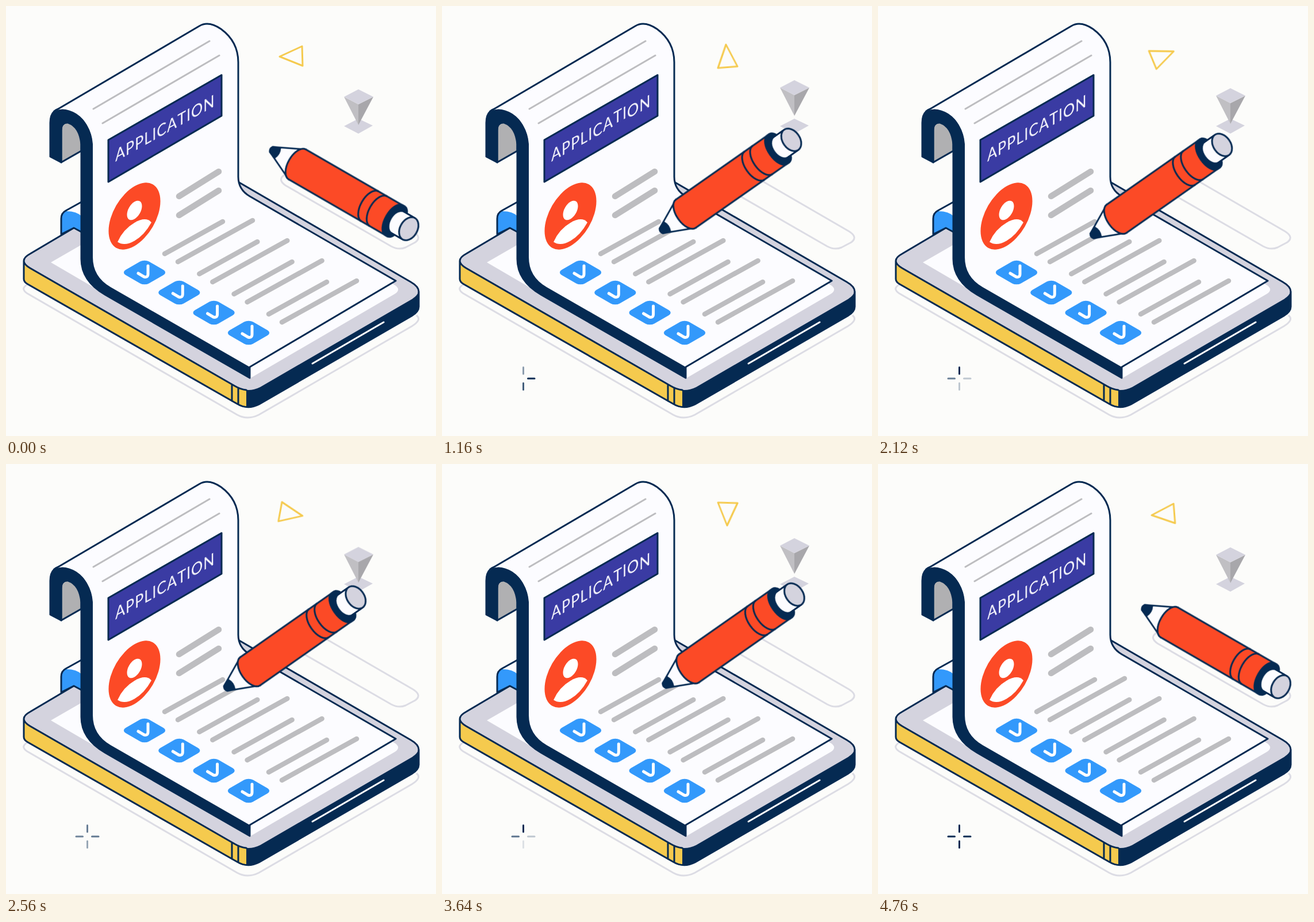
Recreate the animation shown at these times as an HTML page. Size 748 by 748 pixels, loop 4.8 s.

```html
<!DOCTYPE html>
<html lang="en">
<head>
<meta charset="utf-8">
<title>Application form</title>
<style>
  :root {
    --navy: #052a52; --red: #fc4a26; --blue: #3399fb; --yellow: #f5ca4e;
    --lilac: #d4d3de; --grey: #bdbdc0; --paper: #fcfcff;
    --loop: 4800ms; --sine: cubic-bezier(.37, 0, .63, 1);
  }
  html, body { margin: 0; width: 100%; height: 100%; overflow: hidden; background: #fcfcfa; }
  svg { position: absolute; left: 0; top: 0; width: 748px; height: 748px; }
  .line { fill: none; stroke: var(--navy); stroke-width: 3; stroke-linecap: round; stroke-linejoin: round; }
  .edge { stroke: var(--navy); stroke-width: 3; stroke-linejoin: round; }
  .trace { fill: none; stroke: #dcdce4; stroke-width: 3; }
  .rule { fill: none; stroke: var(--grey); stroke-linecap: round; }

  .title {
    position: absolute; left: 0; top: 0; white-space: nowrap;
    font: 400 29px/1 Lato, "Open Sans", sans-serif; letter-spacing: 1.2px; color: #fcfcff;
    transform-origin: 0 0; transform: matrix(.866, -.485, 0, 1, 190, 245);
  }
  .title span { display: inline-block; animation: hop 2400ms calc(var(--i) * 110ms) infinite; }
  @keyframes hop {
    0%, 6% { transform: none; animation-timing-function: var(--sine); }
    16.7% { transform: translateY(-4px); animation-timing-function: var(--sine); }
    27.4%, 100% { transform: none; }
  }

  .spin { transform-origin: 496px 87px; animation: spin var(--loop) linear infinite; }
  @keyframes spin { to { transform: rotate(360deg); } }

  .gem { animation: bob 1200ms var(--sine) infinite alternate; }
  @keyframes bob { to { transform: translateY(-16px); } }

  .travel { animation: travel var(--loop) var(--sine) infinite; }
  @keyframes travel {
    0% { transform: translate(459px, 248px); animation-timing-function: ease-in; }
    10.83% { transform: translate(427px, 281px); animation-timing-function: ease-out; }
    19.6% { transform: translate(384px, 388px); }
    37.5% { transform: translate(351px, 420px); }
    50% { transform: translate(385px, 387px); }
    62.5% { transform: translate(353px, 418px); }
    75% { transform: translate(384px, 388px); animation-timing-function: ease-in; }
    87.5% { transform: translate(427px, 281px); animation-timing-function: ease-out; }
    98.3%, 100% { transform: translate(459px, 248px); }
  }
  .tilt { animation: tilt var(--loop) var(--sine) infinite; }
  @keyframes tilt {
    0% { transform: rotate(30deg); }
    10.5%, 87.5% { transform: rotate(-35deg); }
    98.3%, 100% { transform: rotate(30deg); }
  }

  .tick { opacity: 0; animation: var(--k) var(--loop) linear infinite; }
  @keyframes up {
    0%, 4% { opacity: 0; } 9%, 11% { opacity: 1; } 24.2% { opacity: .45; }
    44.2% { opacity: 1; } 62.5% { opacity: .2; } 75.8%, 100% { opacity: 1; }
  }
  @keyframes down {
    0%, 9% { opacity: 0; } 10.8% { opacity: .3; } 17% { opacity: 1; } 24.2% { opacity: .75; }
    44.2% { opacity: .25; } 62.5% { opacity: .55; } 75.8% { opacity: .12; } 99%, 100% { opacity: 1; }
  }
  @keyframes right {
    0%, 17% { opacity: 0; } 23%, 25% { opacity: 1; } 44.2% { opacity: .25; }
    62.5% { opacity: 1; } 75.8% { opacity: .25; } 99%, 100% { opacity: 1; }
  }
  @keyframes left {
    0%, 26% { opacity: 0; } 44.2% { opacity: .6; } 62.5% { opacity: .55; }
    75.8% { opacity: .65; } 99%, 100% { opacity: 1; }
  }
</style>
</head>
<body>
<svg viewBox="0 0 748 748">
  <defs>
    <g id="row">
      <path class="rule" stroke-width="8.500" d="M276 431L377 375M299 445L429 373"/>
      <rect x="-23.5" y="-23.5" width="47" height="47" rx="9" fill="var(--blue)"
            transform="matrix(.866 .5 .866 -.5 241 463.5)"/>
      <path d="M230 465L240 471Q247 473 247 466V452" fill="none" stroke="#fff" stroke-width="5"
            stroke-linecap="round" stroke-linejoin="round"/>
    </g>
  </defs>

  <!-- ground outlines -->
  <path class="trace" d="M40 483Q23 491 37 500L402 711Q420 721 440 711L706 557Q724 546 714 538"/>
  <path class="trace" d="M512 285Q522 284 532 290L708 392Q724 402 712 411L695 420Q683 425 670 418L486 312Q472 302 484 294L500 287Q506 284 512 285Z"/>

  <!-- tablet -->
  <path fill="var(--navy)" d="M31 442V479L402 692Q420 703 440 693L706 539Q718 532 718 523V496L420 660Z"/>
  <path fill="var(--yellow)" d="M31 442V475Q31 480 38 484L395 689Q407 696 418 697V660Z"/>
  <path fill="var(--lilac)" d="M42 431L330 264L704 480Q729 496 706 510L442 663Q420 674 398 661L42 456Q20 443 42 431Z"/>
  <path fill="var(--paper)" d="M78 446L330 301L672 483Q690 492 676 501L424 648Z"/>
  <path class="line" d="M118 386L42 431Q20 443 42 456L398 661Q408 667 418 668M404 306L704 480Q718 488 718 497V523Q718 532 706 539L440 693Q420 703 402 692L38 484Q31 480 31 475V443M393 659V687M404 665V693"/>
  <path d="M533 622L657 550" stroke="#fff" stroke-width="3" stroke-linecap="round"/>

  <!-- block behind the sheet -->
  <path fill="var(--blue)" d="M96 396V370Q96 360 104 356L132 340V393L118 385Z"/>
  <path fill="var(--paper)" d="M102 357L132 340V366Q122 356 102 357Z"/>
  <path class="line" d="M96 396V370Q96 360 104 356L131 341M96 397L118 386L131 393"/>

  <!-- sheet -->
  <path class="edge" fill="#b0b0b2" d="M96 272V212Q98 202 108 203Q128 210 131 240V252Z"/>
  <path class="edge" fill="var(--navy)" d="M77 262V203Q77 176 104 178Q140 190 151 238L424 628V647L172 502Q131 478 131 440V240Q130 206 106 202Q96 204 96 216V272Z"/>
  <path fill="var(--paper)" d="M86 182L336 35Q352 25 374 40Q404 62 404 98V297C404 313 412 324 424 331L678 478L424 628L182 489Q151 471 151 437V240Q148 204 122 187Q102 175 86 182Z"/>
  <path class="line" d="M84 183L336 35Q352 25 374 40Q404 62 404 98V297C404 313 412 324 424 331L678 478L424 628"/>
  <path class="rule" stroke-width="3" d="M152 179L354 61M168 204L371 86"/>
  <path class="edge" fill="#3a3ba3" d="M178 233L375 120V191L178 306Z"/>

  <g transform="matrix(.866 -.5 0 1 223.5 365.5)">
    <circle r="52" fill="var(--red)"/>
    <circle cy="-10" r="15" fill="#fff"/>
    <path fill="#fff" d="M-34 28Q-23 11.500 0 11.500Q23 11.500 34 28Q20 43 0 43Q-20 43 -34 28Z"/>
  </g>
  <path class="rule" stroke-width="10.500" d="M301 331L370 288M301 364L370 321"/>
  <use href="#row"/>
  <use href="#row" x="60.3" y="35"/>
  <use href="#row" x="120.6" y="70"/>
  <use href="#row" x="181" y="105"/>

  <!-- floating bits -->
  <path class="spin" d="M476 88L515 70L516 104Z" fill="none" stroke="var(--yellow)" stroke-width="3" stroke-linejoin="round"/>
  <path fill="var(--lilac)" d="M588 209L613 196L638 208L613 222Z"/>
  <g class="gem">
    <path fill="#c0bfc3" d="M588 158L613 171V207Z"/>
    <path fill="#a8a7ab" d="M639 158L613 171V207Z"/>
    <path fill="var(--lilac)" d="M588 158L613 145L639 158L613 171Z"/>
  </g>
  <g class="line">
    <path class="tick" style="--k:up" d="M141.500 628.500V640"/>
    <path class="tick" style="--k:down" d="M141.500 656V667.500"/>
    <path class="tick" style="--k:right" d="M149.500 648H161"/>
    <path class="tick" style="--k:left" d="M122 648H133.500"/>
  </g>

  <!-- pencil, tip at the origin, pointing along -x -->
  <g class="travel"><g class="tilt edge">
    <path fill="var(--paper)" d="M3 -5L55 -30V30L3 5Z"/>
    <path fill="var(--navy)" d="M3 -5L15 -10Q20 0 15 10L3 5Q-1 0 3 -5Z"/>
    <path fill="var(--red)" d="M55 -30H254V30H55A16 30 0 0 1 55 -30Z"/>
    <path fill="none" d="M201 -30A16 30 0 0 0 201 30M218 -30A16 30 0 0 0 218 30"/>
    <path fill="var(--navy)" d="M249 -30H254A13 30 0 0 1 254 30H249A15 30 0 0 1 249 -30Z"/>
    <path fill="var(--paper)" d="M257 -21.500H279V21.500H257A14 21.500 0 0 1 257 -21.500Z"/>
    <ellipse fill="var(--lilac)" cx="279" rx="15" ry="21.500"/>
  </g></g>
</svg>
<div class="title"></div>
<script>
  const title = document.querySelector('.title');
  [...'APPLICATION'].forEach((char, i) => {
    const span = document.createElement('span');
    span.textContent = char;
    span.style.setProperty('--i', i);
    title.append(span);
  });
</script>
</body>
</html>
```
